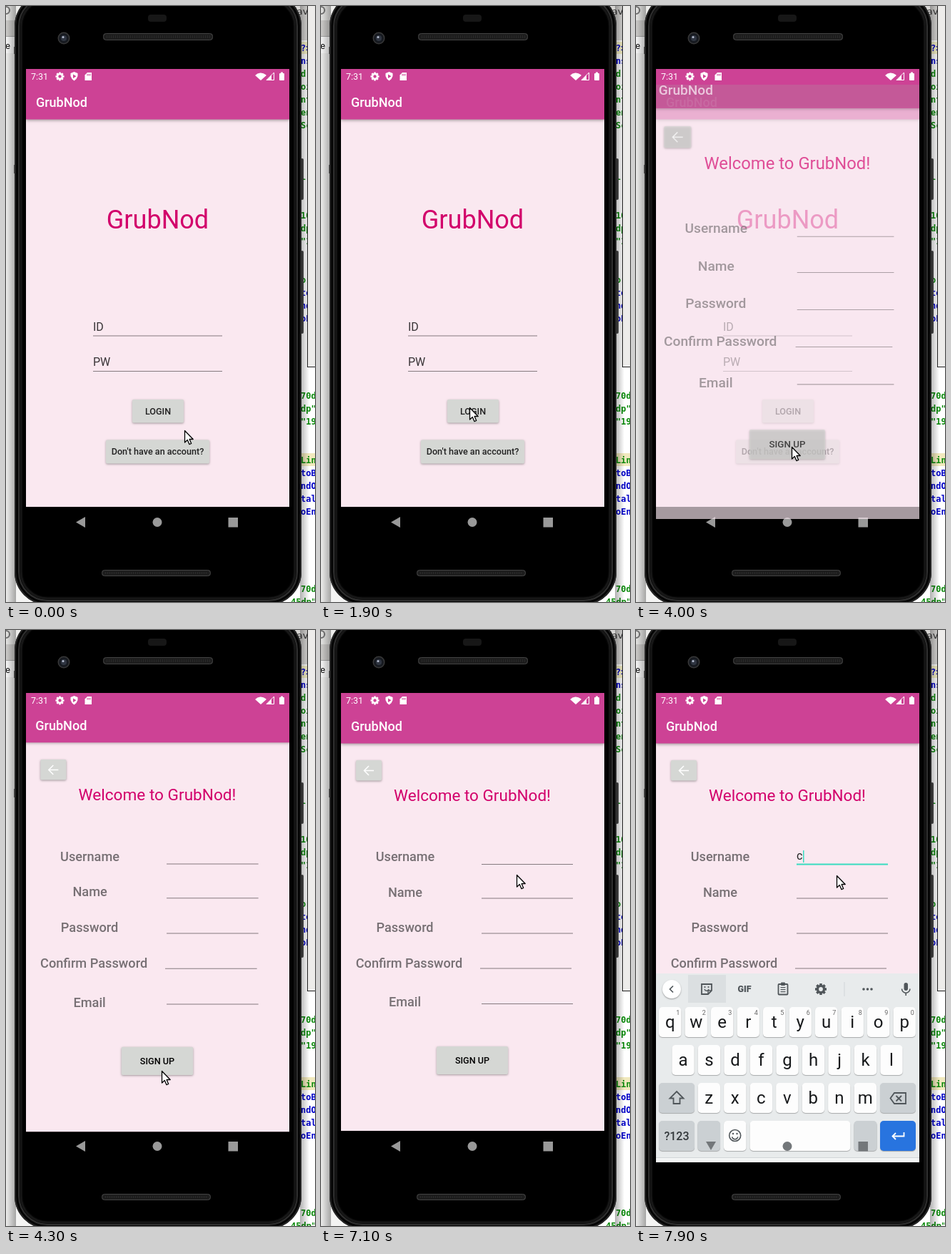
Animation, 433 px wide and 833 px high, one loop 8000 ms. Source, as an HTML page with a canvas:

```html
<!DOCTYPE html>
<html lang="en">
<head>
<meta charset="utf-8">
<title>Sign-up demo</title>
<style>
html, body { margin: 0; width: 100%; height: 100%; overflow: hidden; background: #fff; }
canvas { display: block; width: 433px; height: 833px; }
</style>
</head>
<body>
<canvas id="stage"></canvas>
<script>
const W = 433, H = 833, LOOP = 8000, STEP = 100;
const APP = 'GrubNod';
const SANS = 'Roboto, sans-serif';
const MONO = '"DejaVu Sans Mono", monospace';
const PINK = '#cd4295', BODY = '#fae8f0', ROSE = '#d2006b', KEY = '#fdfdfd', GREY = '#cbd0d3', ICON = '#50565a';

const canvas = document.getElementById('stage');
const dpr = window.devicePixelRatio || 1;
canvas.width = W * dpr;
canvas.height = H * dpr;
const c = canvas.getContext('2d');

// Pointer tip: time, x, y
const path = [
  [0, 250, 593], [200, 272, 607], [400, 294, 578], [600, 262, 480], [900, 178, 374],
  [1000, 150, 356], [1200, 130, 351], [1300, 99, 385], [1500, 170, 560], [1600, 250, 607],
  [1700, 288, 590], [1800, 208, 553], [1900, 208, 561], [2700, 208, 561], [3000, 211, 598],
  [3300, 215, 573], [3500, 215, 573], [3800, 218, 616], [5500, 218, 616], [5600, 215, 614],
  [5800, 208, 607], [5900, 208, 607], [6100, 208, 603], [6200, 208, 603], [6300, 208, 601],
  [6400, 208, 601], [6800, 240, 401], [6900, 240, 401], [7100, 274, 342], [7200, 281, 343], [LOOP, 281, 343]
];

function pointerAt(t) {
  const i = Math.max(1, path.findIndex(p => p[0] >= t));
  const [t0, x0, y0] = path[i - 1], [t1, x1, y1] = path[i];
  const k = (t - t0) / (t1 - t0);
  return [Math.round(x0 + (x1 - x0) * k), Math.round(y0 + (y1 - y0) * k)];
}

function rect(x, y, w, h, fill, r = 0) {
  c.fillStyle = fill;
  c.beginPath();
  c.roundRect(x, y, w, h, r);
  c.fill();
}

function frame(x, y, w, h, r, color, width) {
  c.strokeStyle = color;
  c.lineWidth = width;
  c.beginPath();
  c.roundRect(x, y, w, h, r);
  c.stroke();
}

function disc(x, y, r, fill) {
  c.fillStyle = fill;
  c.beginPath();
  c.arc(x, y, r, 0, 7);
  c.fill();
}

function shape(points, fill, stroke, width = 1, closed = true) {
  c.beginPath();
  points.forEach(([x, y]) => c.lineTo(x, y));
  if (closed) c.closePath();
  if (fill) { c.fillStyle = fill; c.fill(); }
  if (stroke) { c.strokeStyle = stroke; c.lineWidth = width; c.stroke(); }
}

function text(s, x, y, size, color, align = 'left', weight = 400, family = SANS) {
  c.font = `${weight} ${size}px ${family}`;
  c.textAlign = align;
  c.fillStyle = color;
  c.fillText(s, x, y);
}

function shadowed(blur, dy, draw) {
  c.save();
  c.shadowColor = 'rgba(0,0,0,.35)';
  c.shadowBlur = blur;
  c.shadowOffsetY = dy * dpr;
  draw();
  c.restore();
}

function gear(x, y, r, color, hole) {
  for (let i = 0; i < 4; i++) {
    c.save();
    c.translate(x, y);
    c.rotate(i * Math.PI / 4);
    rect(-r * .22, -r, r * .44, r * 2, color);
    c.restore();
  }
  disc(x, y, r * .78, color);
  disc(x, y, r * .36, hole);
}

const codeLines = {
  0: '?>', 1: 'ns', 2: 'd:', 3: 'oi', 4: 'nt', 5: 'en', 6: 'Sc', 10: "l'", 13: '10', 14: 'dp', 15: '"1',
  18: 'or', 19: 'to', 20: 'nd', 21: 'oE', 27: '70d', 28: 'dp"', 29: '"19', 32: 'Lin', 33: 'toB',
  34: 'ndO', 35: 'tal', 36: 'oEn', 42: '70d', 43: '45dp"'
};
const blueLines = [0, 1, 19, 20, 21, 33, 34, 35, 36];

function backdrop() {
  rect(0, 0, W, H, '#fff');
  rect(0, 0, 40, 20, '#ececea');
  rect(0, 20, 40, 22, '#d2d1cf');
  rect(0, 42, 40, 1, '#aaa');
  rect(0, 66, 40, H, '#f4f4f3');
  c.strokeStyle = '#777';
  c.lineWidth = 2;
  c.beginPath();
  c.arc(0, 6, 5, 0, 7);
  c.stroke();
  text('e', -1, 60, 13, '#111', 'left', 400, SANS);

  rect(390, 0, 43, 48, '#d6d5d3');
  text('.jav', 400, 12, 13, '#333', 'left', 400, '"DejaVu Sans", sans-serif');
  rect(400, 50, 33, 17, '#f4efc5');
  rect(400, 625, 33, 18, '#f1e9bd');
  for (const [n, s] of Object.entries(codeLines)) {
    const color = blueLines.includes(+n) ? '#0000c8' : '#0a8a0a';
    text(s, +n === 43 ? 399 : 413, 62.5 + n * 18, 12, color, 'left', 700, MONO);
  }
  rect(422, 0, 11, 505, '#222');
  rect(423, 0, 10, 504, '#edecea');

  const left = c.createLinearGradient(0, 0, 14, 0);
  left.addColorStop(0, 'rgba(0,0,0,.03)');
  left.addColorStop(1, 'rgba(0,0,0,.32)');
  rect(0, 0, 14, H, left);
  const right = c.createLinearGradient(412, 0, 425, 0);
  right.addColorStop(0, 'rgba(0,0,0,.3)');
  right.addColorStop(1, 'rgba(0,0,0,0)');
  rect(412, 0, 13, H, right);
}

function speaker(x, y, w, h) {
  rect(x, y, w, h, '#1d1d1d', 4);
  frame(x + .5, y + .5, w - 1, h - 1, 4, '#444', 1);
  for (let i = x + 5; i < x + w - 4; i += 3) rect(i, y + 3, 1, h - 6, '#292929');
}

function phone() {
  rect(413, 213, 4, 58, '#383838', 2);
  rect(413, 342, 4, 116, '#383838', 2);
  rect(11, 222, 4, 12, '#555');
  rect(11, 57, 4, 10, '#555');
  rect(12, -18, 402, 855, '#050505', 46);
  frame(13, -17, 400, 853, 45, '#252525', 2);
  frame(18, -12, 390, 843, 40, '#303030', 2);
  frame(21, -9, 384, 837, 37, '#171717', 3);
  rect(24, -6, 378, 831, '#000', 34);
  rect(199, 12, 26, 10, '#171717', 4);
  speaker(136, 38, 154, 10);
  speaker(134, 788, 153, 9);
  disc(81, 45, 8.5, '#383838');
  disc(81, 45, 7, '#171a20');
  disc(81, 45, 4, '#303642');
  disc(80, 43.5, 1.5, '#b7bfd0');
}

function statusBar() {
  rect(28, 88, 369, 22, PINK);
  text('7:31', 35, 103, 12.5, '#fff');
  gear(75.5, 98.5, 6, '#fff', PINK);
  shape([[95.5, 92], [100.5, 94], [100.5, 98], [98.5, 102], [95.5, 104.5], [92.5, 102], [90.5, 98], [90.5, 94]], '#fff');
  shape([[94, 95.5], [98.5, 98.2], [94, 101]], PINK);
  shape([[114, 93], [120, 93], [120, 104], [110.5, 104], [110.5, 96.5]], '#fff');
  for (let x = 113.5; x < 119; x += 2) rect(x, 95, 1, 2.5, PINK);
  c.fillStyle = '#fff';
  c.beginPath();
  c.moveTo(357, 104);
  c.arc(357, 104, 10.5, -Math.PI * .77, -Math.PI * .23);
  c.fill();
  shape([[375.5, 93], [375.5, 103.5], [365, 103.5]], null, '#fff', 1);
  shape([[372, 96.5], [372, 104], [365, 104]], '#fff');
  rect(383, 94, 7, 10, '#fff', 1);
  rect(385, 92.5, 3, 2, '#fff');
}

function navIcons(color, down) {
  shape(down ? [[98, 715], [112, 715], [105, 727]] : [[111, 714], [111, 729], [98, 721.5]], color);
  disc(212, 721.5, 6.5, color);
  rect(311.5, 715, 13.5, 13.5, color);
}

function page() {
  rect(28, 88, 369, 612, BODY);
  shadowed(4, 1, () => rect(28, 108, 369, 50.5, PINK));
  text(APP, 42, 141, 18, '#fff', 'left', 500);
}

function button(x, y, w, h, label, color) {
  shadowed(3, 1, () => rect(x, y, w, h, '#d5d7d4', 2));
  if (label) text(label, x + w / 2, y + h / 2 + 4.4, 12.6, color, 'center', 500);
}

function login() {
  page();
  text(APP, 212.5, 311, 36, ROSE, 'center');
  text('ID', 122, 454, 16, '#3a3538');
  text('PW', 122, 503, 16, '#3a3538');
  rect(122, 460.5, 181, 1, '#857b80');
  rect(122, 510, 181, 1, '#857b80');
  button(177, 550, 72, 32.5, 'LOGIN', '#222');
  button(140, 606.5, 145, 33, "Don't have an account?", '#222');
}

function signUp(t) {
  page();
  button(49, 182, 36, 28.5);
  shape([[74, 196.5], [61, 196.5]], null, '#fff', 1.5, false);
  shape([[67, 190], [60.5, 196.5], [67, 203]], null, '#fff', 1.5, false);
  text(`Welcome to ${APP}!`, 212, 239, 22.5, ROSE, 'center');
  const fields = [['Username', 118, 323, 327], ['Name', 118, 372.5, 374.5], ['Password', 117.5, 422, 423.5],
    ['Confirm Password', 123.5, 471.5, 472.5], ['Email', 117.5, 526, 522]];
  fields.forEach(([label, x, y, line], i) => {
    text(label, x, y, 18.1, '#777074', 'center', 500);
    rect(i === 3 ? 223 : 225, line, 128, 1, '#857b80');
  });
  button(162, 582, 100, 39, 'SIGN UP', '#000');

  if (t >= 7500) {
    const typed = t >= 7700;
    rect(225, 326.5, 128, 2, '#38dcc0');
    if (typed) text('c', 225, 321, 16, '#222');
    rect(typed ? 234 : 225, 308, 1.5, 17, '#38dcc0');
  }
}

function keyCap(x, y, w, fill = KEY) {
  c.save();
  c.shadowColor = 'rgba(0,0,0,.28)';
  c.shadowBlur = 1;
  c.shadowOffsetY = dpr;
  rect(x, y, w, 42, fill, 5);
  c.restore();
}

function keyRow(letters, x, y, numbers) {
  [...letters].forEach((ch, i) => {
    const cx = x + i * 36.5;
    keyCap(cx - 15.7, y, 31.4);
    text(ch, cx, y + 28.5, 24, '#17191b', 'center');
    if (numbers) text(String((i + 1) % 10), cx + 11, y + 11, 9, '#666', 'center');
  });
}

function toolbar() {
  rect(73, 482, 53, 39, '#dbdfe1');
  shadowed(2, 1, () => disc(50, 502, 13, '#fff'));
  shape([[52, 497.5], [47.5, 502], [52, 506.5]], null, ICON, 1.7, false);

  shape([[92, 495], [106, 495], [106, 504], [101, 509], [92, 509]], null, ICON, 1.8);
  shape([[101, 509], [101, 504], [106, 504]], null, ICON, 1.4, false);
  disc(96.5, 499, 1.1, ICON);
  disc(101.5, 499, 1.1, ICON);
  c.beginPath();
  c.arc(99, 501, 3.2, .3, 2.8);
  c.stroke();

  text('GIF', 152, 506, 12.5, ICON, 'center', 900);
  frame(199.5, 495, 13, 14.5, 1, ICON, 1.8);
  rect(203, 492.5, 6, 4.5, ICON, 1);
  for (let y = 499; y < 507; y += 3) rect(202.5, y, 7, 1.2, ICON);
  gear(259, 502, 8, ICON, '#e8ebec');
  rect(291.5, 492, 1, 20, '#d0d5d7');
  for (let x = 319; x < 331; x += 5.5) disc(x, 502, 1.8, ICON);
  rect(375.5, 493, 5.5, 11, ICON, 2.75);
  c.strokeStyle = ICON;
  c.lineWidth = 1.6;
  c.beginPath();
  c.arc(378.2, 501.5, 5.7, 0, Math.PI);
  c.stroke();
  rect(377.4, 507, 1.6, 4, ICON);
}

function keyboard() {
  rect(28, 480, 369, 264, '#e8ebec');
  toolbar();
  keyRow('qwertyuiop', 47.7, 527, true);
  keyRow('asdfghjkl', 66, 580);
  keyRow('zxcvbnm', 102.3, 633);

  keyCap(32, 633, 50, GREY);
  shape([[57, 645], [66.5, 654.5], [61.5, 654.5], [61.5, 662], [52.5, 662], [52.5, 654.5], [47.5, 654.5]], null, ICON, 1.8);
  keyCap(342, 633, 50, GREY);
  shape([[362, 647], [378, 647], [378, 662], [362, 662], [356.5, 654.5]], null, ICON, 1.8);
  shape([[364.5, 651], [372, 658.5]], null, ICON, 1.8, false);
  shape([[372, 651], [364.5, 658.5]], null, ICON, 1.8, false);

  keyCap(32, 686, 50, GREY);
  text('?123', 57, 713, 16, '#33383b', 'center', 500);
  keyCap(86.5, 686, 31.5, GREY);
  keyCap(123, 686, 31.5);
  c.strokeStyle = ICON;
  c.lineWidth = 1.6;
  c.beginPath();
  c.arc(138.7, 706.5, 8, 0, 7);
  c.stroke();
  c.beginPath();
  c.arc(138.7, 707.5, 4.2, .2, 2.94);
  c.stroke();
  disc(136, 704, 1.2, ICON);
  disc(141.5, 704, 1.2, ICON);
  keyCap(159.5, 686, 141);
  keyCap(305.5, 686, 32, GREY);
  keyCap(342, 686, 50, '#2874df');
  shape([[375.5, 702], [375.5, 707.5], [359.5, 707.5]], null, '#fff', 1.8, false);
  shape([[364, 703], [359.5, 707.5], [364, 712]], null, '#fff', 1.8, false);
  rect(28, 737, 369, 1, '#d2d6d8');
  rect(28, 738, 369, 6, '#f3f5f5');
}

function screen(t) {
  c.save();
  c.beginPath();
  c.rect(28, 88, 369, 656);
  c.clip();
  rect(28, 88, 369, 656, '#000');
  navIcons('#999');
  if (t < 4100) login();
  if (t >= 4000) {
    const left = Math.max(0, (4500 - t) / 600);
    const zoom = 1 + .1 * Math.pow(left, 2.8);
    c.save();
    c.globalAlpha = Math.min(1, (t - 3900) / 150);
    c.translate(212.5, 416);
    c.scale(zoom, zoom);
    c.translate(-212.5, -416);
    signUp(t);
    c.restore();
  }
  if (t >= 7800) {
    c.save();
    c.translate(0, t < 7900 ? 110 : 0);
    keyboard();
    c.restore();
    navIcons('#73777a', true);
  }
  statusBar();
  c.restore();
}

function pointer(t) {
  const [x, y] = pointerAt(t);
  const arrow = [[0, 0], [0, 16.5], [3.8, 13], [6.5, 19.2], [9.2, 18], [6.6, 12], [11.7, 12]];
  c.lineJoin = 'round';
  shape(arrow.map(([px, py]) => [x + .5 + px, y + .5 + py]), '#fff', '#000', 1.3);
  c.lineJoin = 'miter';
}

function draw(now) {
  const t = Math.floor((now % LOOP) / STEP) * STEP;
  c.setTransform(dpr, 0, 0, dpr, 0, 0);
  backdrop();
  phone();
  screen(t);
  pointer(t);
  requestAnimationFrame(draw);
}
requestAnimationFrame(draw);
</script>
</body>
</html>
```
